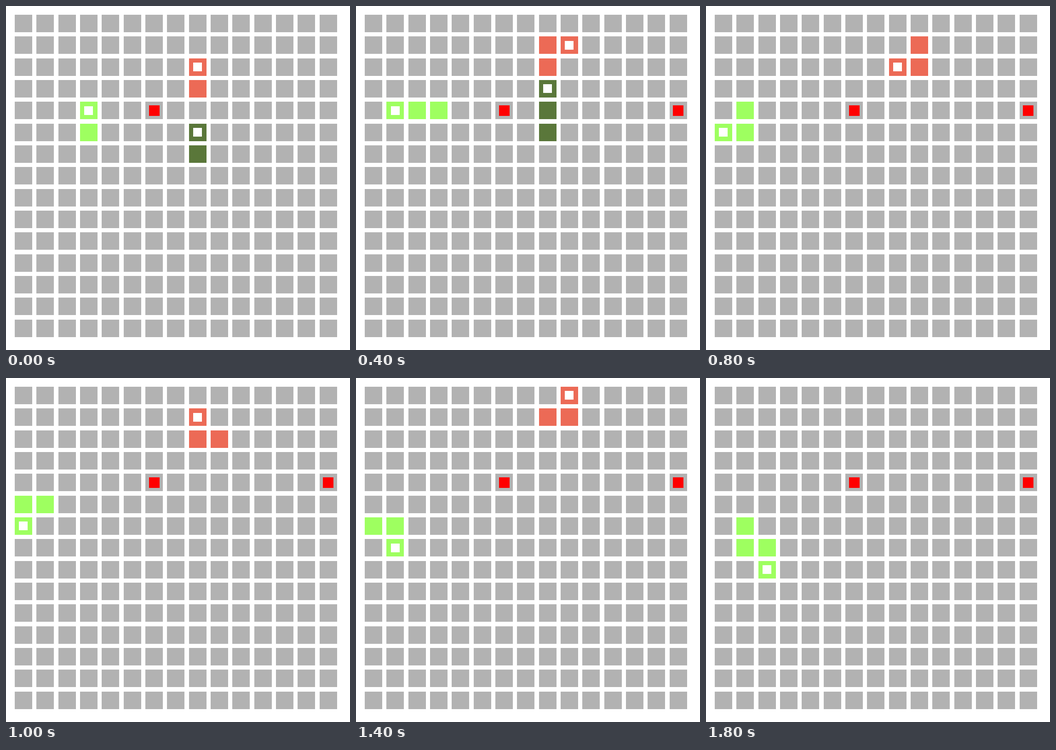
Recreate the animation shown at these times as an HTML page with a canvas. Size 748 px wide and 748 px high, loop 2 s.

```html
<!DOCTYPE html>
<html lang="en">
<head>
<meta charset="utf-8">
<title>Snakes</title>
<style>
  html, body { margin: 0; width: 100%; height: 100%; overflow: hidden; background: #fff; }
  canvas { display: block; }
</style>
</head>
<body>
<canvas id="stage" width="748" height="748"></canvas>
<script>
const ctx = document.getElementById('stage').getContext('2d');
const CELLS = 15, PITCH = 748 / 15.8, CELL = 0.8 * PITCH;
const STEP = 200, STEPS = 10;
const DIRS = { U: [0, -1], D: [0, 1], L: [-1, 0], R: [1, 0] };

// Each snake starts at its tail cell, makes one move per step and dies when its moves run out.
const snakes = [
  { color: '#9eff60', path: walk(3, 5, 'ULLDLDRDRD'), growAt: 8 },
  { color: '#ec6a56', path: walk(8, 3, 'UURDLURUR') },
  { color: '#5a773a', path: walk(8, 6, 'UUU') }
];
const foods = [
  { x: 6, y: 4, from: 0, to: STEPS },
  { x: 14, y: 4, from: 1, to: STEPS },
  { x: 1, y: 7, from: 6, to: 7 }
];

function walk(x, y, moves) {
  const path = [[x, y]];
  for (const m of moves) {
    x += DIRS[m][0];
    y += DIRS[m][1];
    path.push([x, y]);
  }
  return path;
}

// Centred square inside a grid cell, aligned to whole pixels.
function square(x, y, color, scale = 1) {
  const size = Math.round(CELL * scale);
  const place = n => Math.round((n + 0.4) * PITCH + CELL * (1 - scale) / 2);
  ctx.fillStyle = color;
  ctx.fillRect(place(x), place(y), size, size);
}

function draw(step) {
  ctx.fillStyle = '#fff';
  ctx.fillRect(0, 0, 748, 748);
  for (let y = 0; y < CELLS; y++)
    for (let x = 0; x < CELLS; x++) square(x, y, '#b2b2b2');

  for (const f of foods)
    if (step >= f.from && step < f.to) square(f.x, f.y, '#f00', 0.6);

  for (const { color, path, growAt = STEPS } of snakes) {
    const head = step + 1;
    if (head >= path.length) continue;
    const length = step >= growAt ? 4 : 3;
    for (const [x, y] of path.slice(Math.max(0, head - length + 1), head + 1))
      square(x, y, color);
    square(...path[head], '#fff', 0.5);
  }
}

const start = performance.now();
let shown = -1;
function tick() {
  const step = Math.floor((performance.now() - start) / STEP) % STEPS;
  if (step !== shown) draw(shown = step);
  requestAnimationFrame(tick);
}
tick();
</script>
</body>
</html>
```
